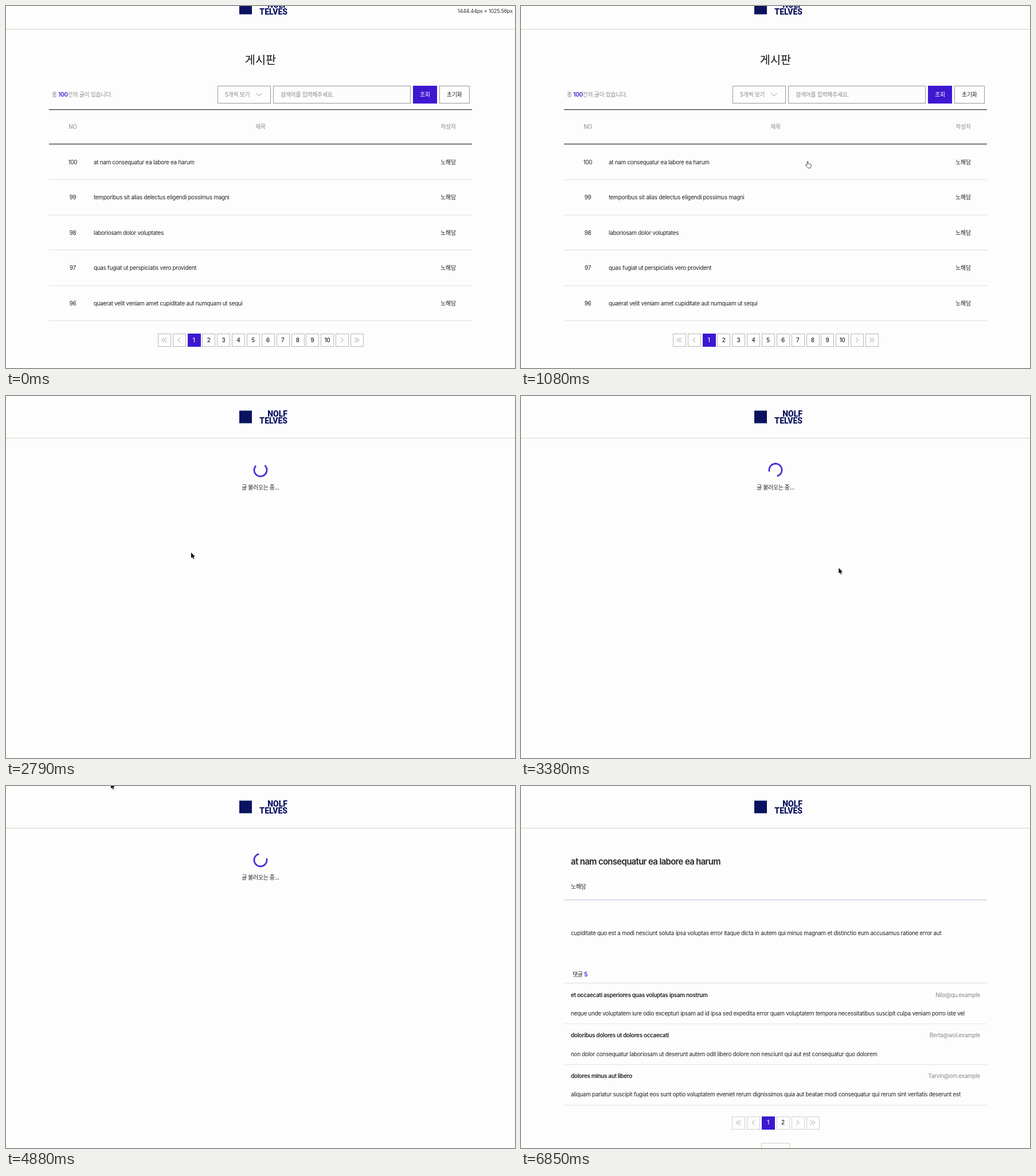
Recreate the animation shown at these times as an HTML page. Size 888x631 px, loop 7.33 s.

```html
<!DOCTYPE html>
<html lang="ko">
<head>
<meta charset="utf-8">
<title>게시판</title>
<style>
  html, body { margin: 0; width: 100%; height: 100%; overflow: hidden; background: #fdfdfd; }
  svg { display: block; width: 100%; height: 100%; overflow: hidden; }
  text {
    font: 400 9.85px Inter, "Noto Sans CJK KR", "Noto Sans CJK", sans-serif;
    letter-spacing: -.026em; fill: #222; white-space: pre;
  }
  .m { text-anchor: middle; }
  .e { text-anchor: end; }
  .md { font-weight: 500; }
  .b { font-weight: 600; letter-spacing: -.03em; }
  .g { fill: #888; }
  .p { fill: #3d18d0; }
  .w { fill: #fff; }
  .h1 { font-size: 19.7px; font-weight: 500; letter-spacing: 0; fill: #111; }
  .h2 { font-size: 14.8px; font-weight: 600; letter-spacing: -.04em; }
  .size { font-size: 9.15px; fill: #333; }
  .brand { font: 800 14px Roboto, sans-serif; letter-spacing: 0; fill: #0b1360; }
  .ico { fill: none; stroke: #888; stroke-width: .9; }

  .scene, .head, .hover, .tip, .arrow, .hand { animation: 7330ms step-end infinite; }
  .list { animation-name: list; }
  .load { animation-name: load; }
  .post { animation-name: post; }
  .head { animation-name: head; }
  .hover { animation-name: hover; }
  .tip { animation-name: tip; }
  .arrow { animation-name: arrow; }
  .hand { animation-name: hand; }
  .spin { transform-origin: 444px 129px; animation: spin 7330ms linear infinite; }
  .cursor { animation: move 7330ms linear infinite; }

  @keyframes list { 0% { visibility: visible } 38.06%, 100% { visibility: hidden } }
  @keyframes load { 0% { visibility: hidden } 38.06% { visibility: visible } 67.66%, 100% { visibility: hidden } }
  @keyframes post { 0% { visibility: hidden } 67.66%, 100% { visibility: visible } }
  @keyframes head { 0% { transform: translateY(-33px) } 38.06%, 100% { transform: none } }
  @keyframes tip { 0% { opacity: 1 } 13.6%, 100% { opacity: 0 } }
  @keyframes hover {
    0% { fill: #222; font-weight: 400; letter-spacing: -.026em }
    18.5%, 100% { fill: #3d18d0; font-weight: 600; letter-spacing: -.03em }
  }
  @keyframes arrow { 0% { opacity: 1 } 2.8% { opacity: 0 } 38.06%, 100% { opacity: 1 } }
  @keyframes hand { 0% { opacity: 0 } 2.8% { opacity: 1 } 38.06%, 100% { opacity: 0 } }
  /* one turn per second, gap on top when loading begins */
  @keyframes spin { from { transform: rotate(-1051.9deg) } to { transform: rotate(1586.9deg) } }
  @keyframes move {
    0%, 1.09% { transform: translate(900px, 330px) }
    4.5% { transform: translate(720px, 300px) }
    7.91% { transform: translate(597.5px, 274px) }
    9.41%, 11.19% { transform: translate(572px, 270px); animation-timing-function: ease-in-out }
    20.74%, 21.83% { transform: translate(322.5px, 272.5px) }
    23.06%, 38.06% { transform: translate(323px, 273px); animation-timing-function: ease-in }
    46.11% { transform: translate(554px, 299.5px) }
    48.2% { transform: translate(588px, 330px); animation-timing-function: ease-out }
    51.2% { transform: translate(614px, 364px); animation-timing-function: ease-in }
    57.57% { transform: translate(475px, 265.5px) }
    58.25% { transform: translate(448px, 250px); animation-timing-function: ease-out }
    66.57%, 67.65% { transform: translate(183px, -5px) }
    67.66%, 100% { transform: translate(-60px, -60px) }
  }
</style>
</head>
<body>
<svg id="stage" viewBox="0 0 888 631"></svg>
<script>
  const PURPLE = '#3d18d0';
  const text = (x, y, s, c = '') => `<text x="${x}" y="${y}" dy=".36em" class="${c}">${s}</text>`;
  const line = (y, color, h = 1, x = 75, w = 738) =>
    `<rect x="${x}" y="${y}" width="${w}" height="${h}" fill="${color}"/>`;
  const box = (x, y, w, h, stroke, fill = 'none') =>
    `<rect x="${x + .5}" y="${y + .5}" width="${w - 1}" height="${h - 1}" fill="${fill}" stroke="${stroke}"/>`;
  const icon = d => `<path class="ico" d="${d}"/>`;
  const chevron = (x, y, dir) => icon(`M${x - 2 * dir} ${y - 4}l${4 * dir} 4l${-4 * dir} 4`);

  function pager(left, top, pages, border) {
    let out = '';
    const count = pages + 4, cy = top + 11.2;
    for (let i = 0; i < count; i++) {
      const x = left + i * 25.85, cx = x + 11.1, on = i === 2;
      out += box(Math.round(x), Math.round(top), 23, 23, on ? PURPLE : border, on ? PURPLE : 'none');
      if (i === 0 || i === count - 1) {
        const dir = i ? 1 : -1;
        out += chevron(cx - 2, cy, dir) + chevron(cx + 2, cy, dir);
      } else if (i === 1 || i === count - 2) {
        out += chevron(cx, cy, i === 1 ? -1 : 1);
      } else {
        out += text(cx, cy, i - 1, 'm md' + (on ? ' w' : ''));
      }
    }
    return out;
  }

  const AUTHOR = '노해담';
  const titles = [
    'at nam consequatur ea labore ea harum',
    'temporibus sit alias delectus eligendi possimus magni',
    'laboriosam dolor voluptates',
    'quas fugiat ut perspiciatis vero provident',
    'quaerat velit veniam amet cupiditate aut numquam ut sequi'
  ];
  const comments = [
    ['et occaecati asperiores quas voluptas ipsam nostrum', 'Nilo@qu.example',
      'neque unde voluptatem iure odio excepturi ipsam ad id ipsa sed expedita error quam voluptatem tempora necessitatibus suscipit culpa veniam porro iste vel'],
    ['doloribus dolores ut dolores occaecati', 'Berta@wol.example',
      'non dolor consequatur laboriosam ut deserunt autem odit libero dolore non nesciunt qui aut est consequatur quo dolorem'],
    ['dolores minus aut libero', 'Tarvin@om.example',
      'aliquam pariatur suscipit fugiat eos sunt optio voluptatem eveniet rerum dignissimos quia aut beatae modi consequatur qui rerum sint veritatis deserunt est']
  ];

  const head = `<g class="head">
    <rect x="407" y="25.5" width="22" height="22" fill="#0b1360"/>
    ${text(491, 30.5, 'NOLF', 'e brand')}${text(491, 42.7, 'TELVES', 'e brand')}
    ${line(73, '#d4d4c4', 1, 0, 888)}</g>`;

  const rows = titles.map((s, i) => {
    const y = 272 + i * 61.5;
    return text(116.5, y, 100 - i, 'm') + text(153, y, s, i ? '' : 'hover') +
      text(771.5, y, AUTHOR, 'm') + line(Math.round(y + 30.3), '#dfdfe9');
  }).join('');

  const list = `<g class="scene list">
    ${text(884, 9, '1444.44px × 1025.56px', 'e size tip')}
    ${text(444, 94, '게시판', 'm h1')}
    ${text(80, 154.5, '총 <tspan class="b p">100</tspan>건의 글이 있습니다.', 'g')}
    ${box(369, 139, 93, 31, '#999')}${text(382, 154.5, '5개씩 보기', 'g')}
    ${icon('M436.5 152l5 5l5 -5')}
    ${box(466, 139, 240, 31, '#999')}${text(479, 154.5, '검색어를 입력해주세요.', 'g')}
    ${box(710, 139, 42, 31, PURPLE, PURPLE)}${text(731, 154.5, '조회', 'm md w')}
    ${box(756, 139, 53, 31, '#999')}${text(782.3, 154.5, '초기화', 'm md')}
    ${line(180, '#2a2a33', 1.2)}${line(240, '#2a2a33', 1.2)}
    ${text(116.5, 210.5, 'NO', 'm g')}${text(444, 210.5, '제목', 'm g')}${text(771.5, 210.5, '작성자', 'm g')}
    ${rows}${pager(264.9, 571, 10, '#b8b8b8')}</g>`;

  const load = `<g class="scene load">
    <circle class="spin" cx="444" cy="129" r="11.1" fill="none" stroke="${PURPLE}"
      stroke-width="2.46" pathLength="100" stroke-dasharray="75 25"/>
    ${text(444, 159, '글 불러오는 중...', 'm md')}</g>`;

  const replies = comments.map(([title, mail, body], i) => {
    const y = 364 + i * 70.8;
    return text(87, y, title, 'b') + text(801, y, mail, 'e g') +
      text(87, y + 32.3, body) + line(Math.round(y + 50), '#e4e4ea');
  }).join('');

  const post = `<g class="scene post">
    ${text(87, 132, titles[0], 'h2')}
    ${text(87, 175, AUTHOR, 'md')}
    ${line(198, '#c4bedd')}
    ${text(87, 256.3, 'cupiditate quo est a modi nesciunt soluta ipsa voluptas error itaque dicta in autem qui minus magnam et distinctio eum accusamus ratione error aut')}
    ${text(90, 328, '댓글 <tspan class="b p">5</tspan>')}
    ${line(343, '#dcdce2')}
    ${replies}${pager(368.3, 575.6, 2, '#cfcfcf')}
    ${box(419, 622, 50, 30, '#cfcfc4')}</g>`;

  const cursor = `<g class="cursor">
    <path class="arrow" d="M0 0V9.6L2.2 7.6 3.7 11 5.3 10.3 3.8 7H6.8Z" fill="#000"
      stroke="#fff" stroke-width=".8" paint-order="stroke"/>
    <path class="hand" d="M-.9.9C-.9-.3.9-.3.9.9V4.2C1.7 3.6 2.6 3.9 2.8 4.6C3.6 4.1 4.4 4.5 4.6 5.2C5.7 4.8 6.5 5.4 6.5 6.4C6.5 9 5.7 9.4 5.4 11.5H.3C-.3 10-2.3 8.6-3.5 6.9C-3.9 6-2.5 5.4-1.7 6.3L-.9 7Z"
      fill="#fff" stroke="#333" stroke-width=".9"/></g>`;

  document.getElementById('stage').innerHTML = list + load + post + head + cursor;
</script>
</body>
</html>
```
